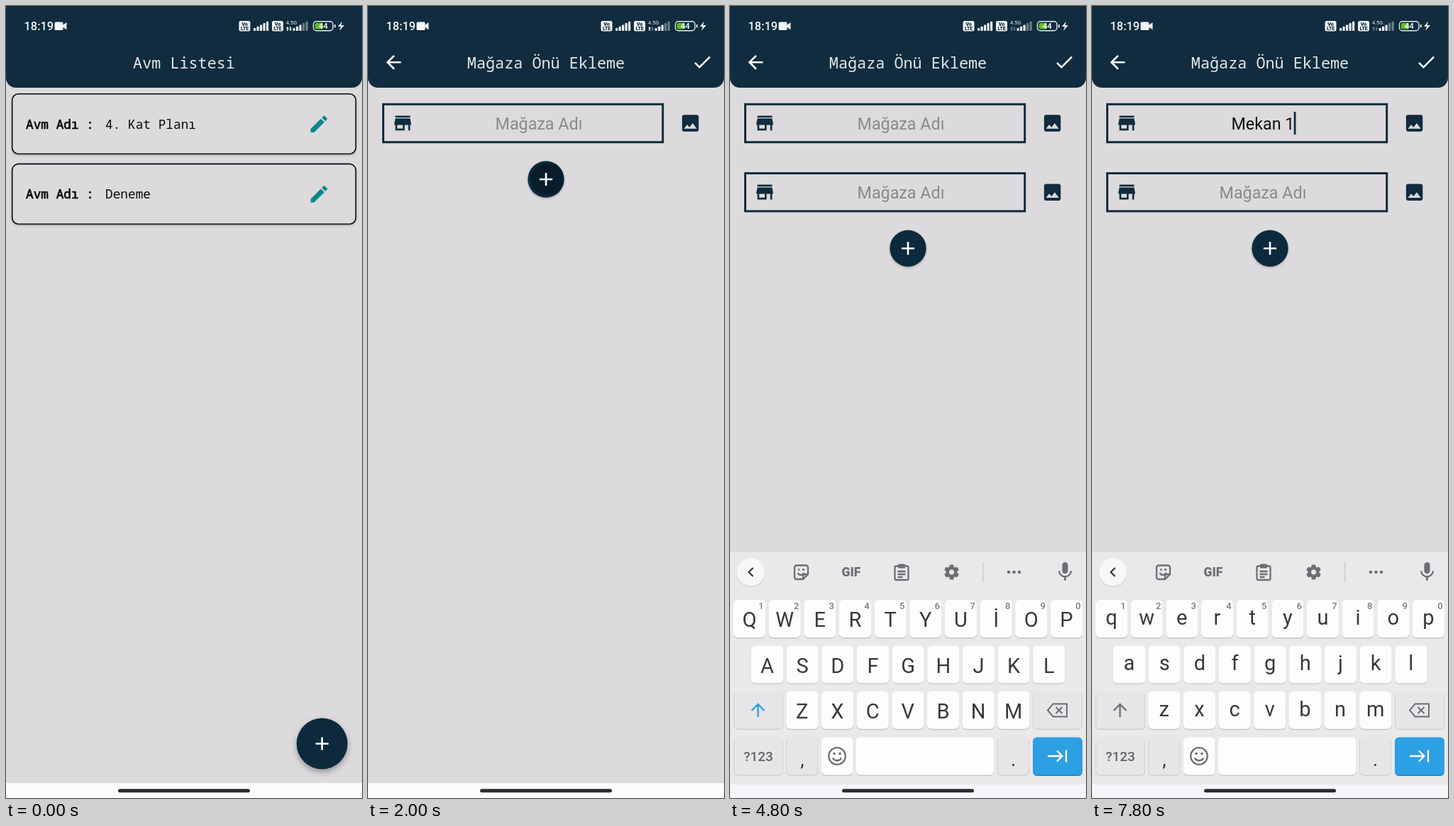
Recreate the animation shown at these times as an HTML page. Size 502x1115 px, loop 8000 ms.

```html
<!DOCTYPE html>
<html lang="tr">
<head>
<meta charset="utf-8">
<style>
  html, body { margin: 0; width: 100%; height: 100%; overflow: hidden; background: #dcdadc; }
  svg { display: block; width: 100vw; height: 100vh; }
  text { font-family: Roboto, sans-serif; white-space: pre; }
  .mid { text-anchor: middle; }
  .mono { font-family: "Noto Sans Mono", monospace; }
  .title { font-size: 21.8px; fill: #e6e8ea; text-anchor: middle; }
  .row { font-size: 17.8px; fill: #0c0c0e; }
  .thick { stroke: #0c0c0e; stroke-width: .7px; }
  .field { font-size: 23.3px; text-anchor: middle; }
  .key { font-size: 29px; fill: #39383c; text-anchor: middle; }
  .line { fill: none; stroke: #6e6d72; stroke-width: 2.3px; }
</style>
</head>
<body>
<svg id="stage" viewBox="0 0 502 1115" preserveAspectRatio="none"></svg>
<script>
const NAVY = '#102c3e', PAPER = '#dcdadc', GREY = '#6e6d72', BLUE = '#2d9fe3', LOOP = 8000;
const ICON = {
  pencil: 'M3 17.25V21h3.75L17.81 9.94l-3.75-3.75L3 17.25zM20.71 7.04c.39-.39.39-1.02 0-1.41l-2.34-2.34c-.39-.39-1.02-.39-1.41 0l-1.83 1.83 3.75 3.75 1.83-1.83z',
  back: 'M20 11H7.83l5.59-5.59L12 4l-8 8 8 8 1.41-1.41L7.83 13H20v-2z',
  check: 'M9 16.17L4.83 12l-1.42 1.41L9 19 21 7l-1.41-1.41z',
  store: 'M20 4H4v2h16V4zm1 10v-2l-1-5H4l-1 5v2h1v6h10v-6h4v6h2v-6h1zm-9 4H6v-4h6v4z',
  image: 'M21 19V5c0-1.1-.9-2-2-2H5c-1.1 0-2 .9-2 2v14c0 1.1.9 2 2 2h14c1.1 0 2-.9 2-2zM8.5 13.5l2.5 3.01L14.5 12l4.5 6H5l3.5-4.5z',
  plus: 'M19 13h-6v6h-2v-6H5v-2h6V5h2v6h6v2z',
  mic: 'M12 14c1.66 0 3-1.34 3-3V5c0-1.66-1.34-3-3-3S9 3.34 9 5v6c0 1.66 1.34 3 3 3zm5.3-3c0 3-2.54 5.1-5.3 5.1S6.7 14 6.7 11H5c0 3.41 2.72 6.23 6 6.72V21h2v-3.28c3.28-.48 6-3.3 6-6.72h-1.7z'
};

const rect = (x, y, w, h, fill, rx = 0, more = '') =>
  `<rect x="${x}" y="${y}" width="${w}" height="${h}" rx="${rx}" fill="${fill}" ${more}/>`;
const text = (x, y, str, cls, more = '') => `<text x="${x}" y="${y}" class="${cls}" ${more}>${str}</text>`;
const icon = (name, x, y, fill, k = 1.3) =>
  `<path d="${ICON[name]}" fill="${fill}" transform="translate(${x} ${y}) scale(${k}) translate(-12 -12)"/>`;
const line = (d, more = '') => `<path d="${d}" class="line" ${more}/>`;
const circle = (x, y, r, fill, more = '') => `<circle cx="${x}" cy="${y}" r="${r}" fill="${fill}" ${more}/>`;

const screen = title => rect(0, 0, 502, 1115, PAPER) + rect(0, 1094, 502, 21, '#fdfbfe') +
  `<path d="M0 0H502V101a14 14 0 0 1-14 14H14a14 14 0 0 1-14-14Z" fill="${NAVY}"/>` +
  text(251, 87.5, title, 'mono title');

const card = (y, name) =>
  rect(8.7, y, 484.6, 84.6, PAPER, 9, 'stroke="#0c0c0e" stroke-width="1.6" filter="url(#soft)"') +
  text(28, y + 49, 'Avm Adı :', 'mono row thick') + text(140, y + 49, name, 'mono row') +
  icon('pencil', 441.3, y + 42.5, '#0a8789');

const field = y => rect(21.5, y, 394.2, 53.4, 'none', 0, `stroke="${NAVY}" stroke-width="3"`) +
  icon('store', 49, y + 26.5, NAVY) + icon('image', 454.6, y + 26.7, NAVY);
const hint = (y, id) => text(241, y, 'Mağaza Adı', 'field', `fill="#8a898c" id="${id}"`);

function bars(x, lit) {
  let out = '';
  for (let i = 0; i < 5; i++) {
    const h = 4 + i * 2.3;
    out += rect(x + i * 4.5, 35 - h, 3.2, h, '#fff', .8, `opacity="${i < lit ? .95 : .4}"`);
  }
  return out;
}
const badge = x => rect(x, 21, 16, 14.5, '#f1f3f4', 2.5) +
  text(x + 8, 28, 'Vo', 'mid', `font-size="7.2" font-weight="800" fill="${NAVY}"`) +
  text(x + 8, 34.4, 'LTE', 'mid', `font-size="6.8" font-weight="800" fill="${NAVY}"`);

const status = () => text(25.5, 34, '18:19', '', 'font-size="16.4" font-weight="500" fill="#f3f5f6"') +
  rect(68.5, 22.5, 12, 11.5, '#f3f5f6', 1.5) + '<path d="M80 27l5.5-4v10.500l-5.500-4z" fill="#f3f5f6"/>' +
  badge(328.5) + bars(349, 5) + badge(375) +
  text(395, 26, '4.5G', '', 'font-size="7.3" fill="#f3f5f6"') +
  '<path id="up" d="M395 31.500l2-2.500 2 2.500h-1.300v3.500h-1.400v-3.500z" fill="#fff"/>' +
  '<path id="down" d="M399 32.500l2 2.500 2-2.500h-1.300v-3.500h-1.400v3.500z" fill="#fff"/>' +
  bars(404.5, 3) +
  rect(433.5, 21.7, 27.500, 13, 'none', 4, 'stroke="#e9ecee" stroke-width="1.4"') +
  rect(435.700, 23.900, 11.300, 8.600, '#5ac01e', 2) + rect(462.800, 26, 2, 4.500, '#e9ecee', 1) +
  text(447.300, 32.200, '44', 'mid', 'font-size="11.500" font-weight="500" fill="#fff"') +
  '<path d="M474 21.500l-6 7.500h4l-2 6 7-8h-4.500z" fill="#f3f5f6"/>';

// Keyboard
const ROWS = ['qwertyuiop', 'asdfghjkl', 'zxcvbnm'], PITCH = 49.66;
const keys = {};
ROWS.forEach((row, r) => [...row].forEach((c, i) => {
  keys[c] = { x: [5, 30, 79.3][r] + i * PITCH, y: 836 + r * 64.4, r };
}));
const cap = (x, y, w, fill = '#fdfcfe', edge = '#c9c7cb') =>
  rect(x, y + 1.4, w, 53, edge, 6) + rect(x, y, w, 53, fill, 6);
const side = (x, y, w) => rect(x, y + 1, w, 53, '#c3c1c5', 6) + rect(x + .6, y + .6, w - 1.2, 52.4, '#e7e5e8', 5.5);

function toolbar() {
  let teeth = '';
  for (let a = 0; a < 180; a += 60) teeth += rect(309.5, 786.5, 6, 21, GREY, 1.5, `transform="rotate(${a} 312.5 797)"`);
  return line('M94 787.500H107a3 3 0 0 1 3 3V800l-7 7H94a3 3 0 0 1-3-3V790.500a3 3 0 0 1 3-3Z M110 800h-4a3 3 0 0 0-3 3v4 M95.500 798c2 4 7 4 9 0 M96 793.500h2.500 M102 793.500h3') +
    text(171, 803.300, 'GIF', 'mid', `font-size="17.500" font-weight="900" fill="${GREY}"`) +
    line('M234.500 788.500h15a2 2 0 0 1 2 2v15.500a2 2 0 0 1-2 2h-15a2 2 0 0 1-2-2v-15.500a2 2 0 0 1 2-2Z M236.500 796h11 M236.500 800h11 M236.500 804h7') +
    rect(237, 785.500, 10, 6, GREY, 1.500) +
    teeth + circle(312.500, 797, 5.800, 'none', `stroke="${GREY}" stroke-width="4.600"`) + circle(312.500, 797, 3.500, '#eae8eb') +
    rect(356, 783, 1.200, 28, '#c6c4c8') + [393, 400.500, 408].map(x => circle(x, 797, 2.300, GREY)).join('');
}
const words = () => [117.5, 249.5, 381].map((x, i) =>
  text(x, 806, '', 'mid', `id="word${i}" font-size="23.300" fill="#39383c"`)).join('') +
  rect(180, 782, 1.2, 30, '#c6c4c8') + rect(319, 782, 1.2, 30, '#c6c4c8');

function keyboard() {
  let out = rect(0, 768, 502, 328, '#eae8eb') + rect(0, 768, 502, 1, '#dfdde0') +
    circle(29.500, 798, 20, '#cfcdd1') + circle(29.500, 797, 19.700, '#f8f6f9') +
    line('', 'id="chevron" style="stroke:#39383c"') +
    `<g id="tools">${toolbar()}</g><g id="words">${words()}</g>` + icon('mic', 472.500, 796.500, GREY, 1.350);
  for (const c in keys) {
    const k = keys[c];
    out += cap(k.x, k.y, 45) + text(k.x + 22.500, 0, c, 'key', `id="key-${c}"`);
  }
  [...ROWS[0]].forEach((c, i) => out += text(keys[c].x + 39, 849, (i + 1) % 10, 'mid',
    'font-size="13" font-weight="500" fill="#7b7a7f"'));
  const y3 = 964.8, y4 = 1029.500;
  return out + side(5, y3, 70) + line('M39.500 1001V983 M30.500 992l9-9 9 9', 'id="shift"') +
    side(427, y3, 70) + line('M455.500 982.500H475V1000.500H455.500L448 991.500Z M459.500 987l9 9 M468.500 987l-9 9', 'style="stroke-width:2px"') +
    side(5, y4, 70) + text(40, 1063, '?123', 'mid', 'font-size="19" font-weight="500" fill="#656469"') +
    side(79.300, y4, 45) + text(102, 1070, ',', 'mid', 'font-size="27" fill="#39383c"') +
    cap(129, y4, 44.500) + circle(151, 1056, 11.800, 'none', `stroke="${GREY}" stroke-width="2.300"`) +
    circle(147, 1052.500, 1.800, GREY) + circle(155, 1052.500, 1.800, GREY) + line('M145 1058.500c2 5 10 5 12 0') +
    cap(178, y4, 194) + rect(178, y4, 194, 53, '#d9d7db', 6, 'id="space"') +
    side(377, y4, 45) + text(399.500, 1070, '.', 'mid', 'font-size="27" fill="#39383c"') +
    cap(427, y4, 70, BLUE, '#2382bb') +
    line('M448 1056H468 M461 1048.500l7.500 7.500-7.500 7.500 M474 1047.500v17', 'style="stroke:#fff"') +
    `<g id="popup">${rect(0, 0, 47, 142, '#fdfcfe', 8, 'filter="url(#soft)"')}` +
    rect(3, 4, 41, 54, BLUE, 7, 'id="pick"') + `${text(23.500, 42, '', 'key', 'id="popText"')}</g>`;
}

const stage = document.getElementById('stage');
stage.innerHTML = `<defs>
  <filter id="soft" x="-30%" y="-30%" width="160%" height="160%"><feDropShadow dx="0" dy="1.500" stdDeviation="1.500" flood-opacity=".22"/></filter>
  <filter id="lift" x="-40%" y="-40%" width="180%" height="180%"><feDropShadow dx="0" dy="4" stdDeviation="4" flood-opacity=".32"/></filter>
  <clipPath id="sheet">${rect(0, 0, 700, 1115, '#000', 0, 'id="sheetRect"')}</clipPath>
  <clipPath id="disc">${circle(251, 244, 25.700, '#000')}</clipPath></defs>
  <g id="list">${screen('Avm Listesi')}${card(123.700, '4. Kat Planı')}${card(222.400, 'Deneme')}
    ${rect(409, 233, 64, 64, '#000', 2, 'id="press" opacity=".13"')}
    ${circle(445.700, 1038.500, 36, NAVY, 'filter="url(#lift)"')}${icon('plus', 445.700, 1038.500, '#fff')}</g>
  ${rect(0, 0, 502, 1115, '#000', 0, 'id="scrim"')}
  <g id="page" clip-path="url(#sheet)">${screen('Mağaza Önü Ekleme')}
    ${icon('back', 36, 79.300, '#fff')}${icon('check', 471.300, 79, '#fff')}
    ${field(138.300)}${hint(174, 'hint')}${text(241, 174, '', 'field', 'id="typed" fill="#101012"')}
    ${rect(0, 149, 2.800, 32, NAVY, 0, 'id="caret"')}
    <g id="second">${field(235.500)}${hint(271.200, 'hint2')}</g>
    <g id="add">${circle(251, 244, 25.700, NAVY, 'filter="url(#soft)"')}
      <g clip-path="url(#disc)">${circle(0, 0, 0, '#071a28', 'id="ripple"')}</g>${icon('plus', 251, 244, '#fff')}</g></g>
  ${rect(0, 768, 502, 347, '#fdfbfe', 0, 'id="tray"')}
  <g id="board">${keyboard()}</g>
  ${rect(0, 1096, 502, 19, '#f7f5f9', 0, 'id="foot"')}
  ${rect(158, 1102.300, 186, 5, '#2b2a2e', 2.500)}${status()}`;

const el = {};
stage.querySelectorAll('[id]').forEach(n => el[n.id] = n);
const set = (id, a, v) => el[id].setAttribute(a, v);
const show = (id, on) => set(id, 'visibility', on ? 'visible' : 'hidden');
const write = (id, s) => { if (el[id].textContent !== s) el[id].textContent = s; };
// Last entry [time, value] that has begun.
const at = (t, track) => track.reduce((v, [from, next]) => t >= from ? next : v, track[0][1]);
const clamp = v => Math.max(0, Math.min(1, v));

const TYPED = [[0, ''], [6100, 'M'], [6400, 'Me'], [6500, 'Mek'], [6600, 'Meka'], [6700, 'Mekan'], [6900, 'Mekan '], [7600, 'Mekan 1']];
const POPUP = [[0, ''], [6000, 'm'], [6100, ''], [6300, 'e'], [6400, 'k'], [6500, 'a'], [6600, 'n'], [6700, ''], [7200, 'q'], [7600, '']];
const WORDS = [[0, 'M,Me,Mi'], [6400, 'Me,Mesaj,Merhaba'], [6500, 'Mek,Mektup,Mekan'], [6600, 'Meka,Mekan,Mekanik'], [6700, 'Mekan,Mekân,Mekanik'], [6900, 've,bir,için']];
const CARET = [[0, 0], [3300, 1], [3800, 0], [4300, 1], [4800, 0], [5300, 1], [5800, 0], [6100, 1], [7400, 0], [7600, 1]];
const DATA = [[0, 3], [400, 0], [2000, 1], [2400, 0], [3400, 3], [4600, 0], [6400, 3], [6600, 0], [7500, 3], [7700, 0]];
const RISE = [[0, 347], [3300, 230], [3400, 60], [3500, 6], [3600, 0]];

function draw(t) {
  // Page push: critically damped spring
  const w = Math.max(0, (t - 1023) * .011);
  const left = t < 1100 ? 1 : t >= 1700 ? 0 : (1 + w) * Math.exp(-w);
  const x = left * 502;
  show('list', left > 0);
  set('list', 'transform', `translate(${(x - 502) / 4} 0)`);
  show('press', t >= 1000);
  set('scrim', 'opacity', (1 - left) / 2);
  set('page', 'transform', `translate(${x} 0)`);
  show('page', left < 1);
  set('sheetRect', 'rx', left > 0 ? 55 : 0);

  // Second field
  const grown = t >= 2400;
  set('second', 'opacity', clamp((t - 2300) / 300));
  set('add', 'transform', `translate(0 ${grown ? 97.2 : 0})`);
  const spread = clamp((t - 1800) / 300);
  set('ripple', 'cx', 255 - 4 * spread);
  set('ripple', 'cy', 244);
  set('ripple', 'r', t >= 2000 ? 16 + 10 * spread : 0);
  set('ripple', 'opacity', .8 * clamp((3000 - t) / 600));

  // Field text
  const typed = at(t, TYPED);
  show('hint', !typed);
  write('typed', typed);
  set('typed', 'text-decoration', typed.length < 6 ? 'underline' : 'none');
  const width = typed ? el.typed.getComputedTextLength() : 0;
  set('caret', 'x', 240.2 + width / 2);
  show('caret', at(t, CARET));

  // Keyboard
  const open = t >= 3300, drop = at(t, RISE);
  ['board', 'tray', 'foot'].forEach(id => set(id, 'display', open ? 'inline' : 'none'));
  set('board', 'transform', `translate(0 ${drop})`);
  set('tray', 'y', t < 3400 ? 768 + drop : 768);
  set('foot', 'y', 1096 + Math.min(drop, 6));
  const upper = t >= 4200 && t < 6100;
  for (const c in keys) {
    write('key-' + c, upper ? c.toLocaleUpperCase('tr') : c);
    set('key-' + c, 'y', keys[c].y + (upper ? 38.3 : 35));
  }
  el.shift.style.stroke = upper ? BLUE : GREY;
  const guess = t >= 6100 && t < 7600;
  set('tools', 'display', guess ? 'none' : 'inline');
  set('words', 'display', guess ? 'inline' : 'none');
  at(t, WORDS).split(',').forEach((s, i) => write('word' + i, s));
  set('chevron', 'd', guess ? 'M26.500 791l6 6-6 6' : 'M32.500 791l-6 6 6 6');
  set('space', 'opacity', t >= 6800 && t < 6900 ? 1 : 0);

  const c = at(t, POPUP), held = t >= 7400;
  set('popup', 'display', c ? 'inline' : 'none');
  if (c) {
    set('popup', 'transform', `translate(${keys[c].x - 1} ${keys[c].y - 88})`);
    write('popText', held ? '1' : upper ? c.toUpperCase() : c);
    el.popText.style.fill = held ? '#fff' : '#39383c';
    set('pick', 'opacity', held ? 1 : 0);
  }

  const data = at(t, DATA);
  set('up', 'opacity', data & 1 ? 1 : .4);
  set('down', 'opacity', data & 2 ? 1 : .4);
}

const start = performance.now();
function tick() {
  const t = (performance.now() - start) % LOOP;
  draw(Math.floor(t / 100) * 100);
  requestAnimationFrame(tick);
}
tick();
</script>
</body>
</html>
```
